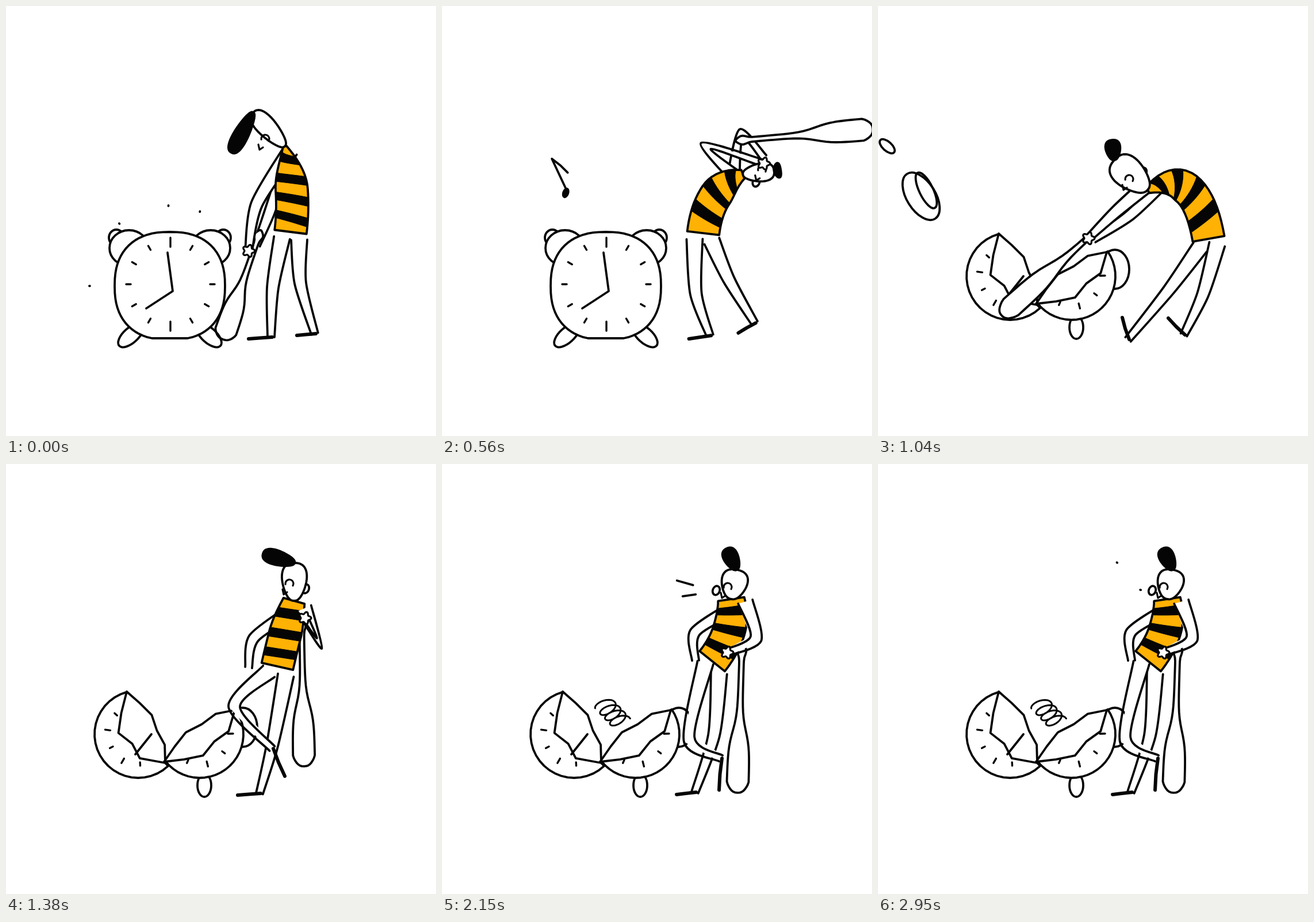
Animation, 748 px wide and 748 px high, one loop 2.98 s. Source, as an HTML page with a canvas:

```html
<!DOCTYPE html>
<html lang="en">
<head>
<meta charset="utf-8">
<title>Alarm clock</title>
<style>
html, body { margin: 0; height: 100%; overflow: hidden; background: #fff; }
canvas { display: block; width: 100vw; height: 100vh; }
</style>
</head>
<body>
<canvas id="stage" width="748" height="748"></canvas>
<script>
const ctx = document.getElementById('stage').getContext('2d');
const LOOP = 2980, HOLD = 70, IMPACT = 940;
const INK = '#050505', PAPER = '#fff', YELLOW = '#ffb104';
const { PI, sin, cos, abs, min, max, sign, hypot, atan2 } = Math;
const rad = degrees => degrees * PI / 180;

// Joints of each key pose. Legs: knee, heel, toe. Arms: elbow, hand.
// Bat: grip x, y, angle, length. Build: half neck, half head, stripe slant, stripes.
const tired = {
  spine: [[485, 244], [497, 320], [495, 393]], build: [3, 17, -.04, 4],
  crown: [430, 185], hair: [392, 255], eye: [451, 231], ear: [463, 213],
  nearArm: [[436, 345], [422, 426]], farArm: [[458, 360], [436, 416]],
  nearLeg: [[464, 490], [461, 576], [422, 579]], farLeg: [[512, 482], [537, 570], [506, 573]],
  bat: [443, 390, 109, 201]
};
const bent = {
  spine: [[504, 254], [521, 320], [516, 396]], build: [7, 17, -.04, 4],
  crown: [414, 227], hair: [380, 291], eye: [458, 250], ear: [468, 233],
  nearArm: [[437, 327], [407, 398]], farArm: [[458, 325], [424, 376]],
  nearLeg: [[451, 486], [461, 575], [422, 579]], farLeg: [[497, 466], [537, 570], [507, 573]],
  bat: [428, 366, 107, 216]
};
const raised = {
  spine: [[527, 300], [468, 331], [443, 395]], build: [8, 16, -.06, 3],
  crown: [608, 298], hair: [628, 284], eye: [575, 291], ear: [561, 320],
  nearArm: [[463, 228], [588, 251]], farArm: [[532, 204], [585, 243]],
  nearLeg: [[440, 503], [467, 573], [431, 579]], farLeg: [[500, 479], [545, 548], [517, 568]],
  bat: [526, 210, 401, 244]
};
const smashing = {
  spine: [[469, 320], [537, 318], [575, 405]], build: [6, 27, .05, 4],
  crown: [411, 268], hair: [407, 233], eye: [437, 301], ear: [461, 289],
  nearArm: [[415, 357], [366, 404]], farArm: [[438, 364], [375, 406]],
  nearLeg: [[505, 495], [435, 580], [425, 542]], farLeg: [[565, 502], [532, 572], [505, 543]],
  bat: [432, 343, 138, 292]
};
const proud = {
  spine: [[501, 238], [485, 298], [472, 352]], build: [19, 22, .02, 3],
  crown: [502, 172], hair: [447, 156], eye: [493, 208], ear: [521, 217],
  nearArm: [[545, 312], [520, 268]], farArm: [[431, 303], [422, 354]],
  nearLeg: [[397, 422], [463, 495], [485, 543]], farLeg: [[463, 490], [441, 573], [403, 576]],
  bat: [514, 266, 89, 260]
};
const whistling = {
  spine: [[503, 235], [499, 290], [470, 343]], build: [23, 23, .02, 3],
  crown: [513, 184], hair: [495, 147], eye: [497, 214], ear: [477, 220],
  nearArm: [[546, 304], [496, 328]], farArm: [[440, 293], [441, 342]],
  nearLeg: [[430, 479], [485, 512], [482, 567]], farLeg: [[473, 472], [440, 571], [408, 575]],
  bat: [522, 312, 91.8, 260]
};
const ACTING = [[0, tired], [350, bent], [630, raised], [840, raised], [950, smashing],
  [1080, smashing], [1330, proud], [1500, proud], [1820, whistling]];

const REST = { at: [285, 487], tilt: 0, size: [1, 1] };
const RINGING = [[0, REST], [350, { at: [281, 462], tilt: -16, size: [.95, 1] }], [560, REST],
  [770, { at: [281, 453], tilt: 0, size: [1, .83] }], [910, REST]];

const blend = (a, b, k) => typeof a === 'number' ? a + (b - a) * k
  : Array.isArray(a) ? a.map((v, i) => blend(v, b[i], k))
  : Object.fromEntries(Object.keys(a).map(name => [name, blend(a[name], b[name], k)]));

function stateAt(track, t) {
  const next = track.findIndex(key => key[0] > t);
  if (next < 0) return track.at(-1)[1];
  const [t0, a] = track[next - 1], [t1, b] = track[next];
  const k = (t - t0) / (t1 - t0);
  return blend(a, b, k * k * (3 - 2 * k));
}

const range = (n, make) => Array.from({ length: n }, (_, i) => make(i));
const move = ([x, y], dx, dy) => [x + dx, y + dy];
const polar = ([x, y], angle, r) => [x + r * cos(angle), y + r * sin(angle)];
const unit = ([ax, ay], [bx, by]) => {
  const length = hypot(bx - ax, by - ay) || 1;
  return [(bx - ax) / length, (by - ay) / length];
};

function paint(fill, width = 3.8) {
  if (fill) { ctx.fillStyle = fill; ctx.fill(); }
  ctx.lineWidth = width;
  ctx.stroke();
}

function line(list, fill, width) {
  ctx.beginPath();
  list.forEach(p => ctx.lineTo(...p));
  paint(fill, width);
}

function ellipse(x, y, rx, ry, tilt = 0, fill) {
  ctx.beginPath();
  ctx.ellipse(x, y, rx, ry, rad(tilt), 0, 2 * PI);
  paint(fill);
}

function placed([x, y], angle, [sx, sy], drawing) {
  ctx.save();
  ctx.translate(x, y);
  ctx.rotate(rad(angle));
  ctx.scale(sx, sy);
  drawing();
  ctx.restore();
}

// Smooth curve through all points.
function smooth(list) {
  ctx.moveTo(...list[0]);
  for (let i = 0; i < list.length - 1; i++) {
    const b = list[i], c = list[i + 1], a = list[i - 1] || b, d = list[i + 2] || c;
    ctx.bezierCurveTo(b[0] + (c[0] - a[0]) / 7, b[1] + (c[1] - a[1]) / 7,
      c[0] - (d[0] - b[0]) / 7, c[1] - (d[1] - b[1]) / 7, ...c);
  }
}

// Two outlines at the given half widths around a chain of joints.
function limb(joints, widths) {
  const side = way => joints.map((p, i) => {
    const [tx, ty] = unit(joints[max(0, i - 1)], p), [ux, uy] = unit(p, joints[min(joints.length - 1, i + 1)]);
    const [nx, ny] = unit([0, 0], [-ty - uy, tx + ux]);
    return move(p, nx * widths[i] * way, ny * widths[i] * way);
  });
  const left = side(1), right = side(-1);
  ctx.fillStyle = PAPER;
  ctx.beginPath();
  [...left, ...right.reverse()].forEach(p => ctx.lineTo(...p));
  ctx.fill();
  ctx.beginPath();
  smooth(left);
  smooth(right);
  paint();
}

// Egg from the wide end a to the narrow end b.
function egg(a, b, half, fill) {
  const [tx, ty] = unit(a, b);
  line(range(49, i => {
    const phi = i * PI / 24, u = (1 - cos(phi)) / 2;
    const v = sign(sin(phi)) * abs(sin(phi)) ** .8 * half * (1.2 - .5 * u);
    return [a[0] + (b[0] - a[0]) * u - ty * v, a[1] + (b[1] - a[1]) * u + tx * v];
  }), fill);
}

function drawBat([x, y, angle, length]) {
  const half = u => 4 + 15 / (1 + Math.exp(10 - 17 * u)) + 5 * Math.exp(-((u * 25 - 1) ** 2));
  const side = way => range(41, i => {
    const u = (1 - cos(i * PI / 40)) / 2;
    return [u * length, way * half(u) * min(1, 3 * (u * (1 - u)) ** .4)];
  });
  placed([x, y], angle, [1, 1], () => line([...side(1), ...side(-1).reverse()], PAPER));
}

function drawClock({ at, tilt, size }) {
  placed(at, tilt, size, () => {
    for (const way of [-1, 1]) {
      ellipse(93 * way, -84, 13, 14);
      ellipse(71 * way, -66, 34, 31, 0, PAPER);
      ellipse(68 * way, 86, 27, 13, 42 * way);
    }
    const round = v => sign(v) * abs(v) ** .84;
    line(range(73, i => [96 * round(cos(i * PI / 36)), min(91, 94 * round(sin(i * PI / 36)))]), PAPER);
    for (let i = 0; i < 12; i++) {
      const reach = i % 3 ? 4 : i % 2 ? 8 : 4;
      line([polar([1, -3], i * PI / 6, 73 - reach), polar([1, -3], i * PI / 6, 73 + reach)], null, 3.4);
    }
    line([[-4, -58], [5, 9], [-41, 39]]);
  });
}

// Jagged crack between two points, bulging to one side.
function crack(from, to, bulge) {
  const [tx, ty] = unit(from, to);
  return range(6, i => {
    const u = i / 5, v = bulge * sin(PI * u) ** .6 * (i % 2 ? .85 : 1.15);
    return [from[0] + (to[0] - from[0]) * u - ty * v, from[1] + (to[1] - from[1]) * u + tx * v];
  });
}

function drawShard(centre, from, to, depth, ticks) {
  const a = atan2(from[1] - centre[1], from[0] - centre[0]);
  let b = atan2(to[1] - centre[1], to[0] - centre[0]);
  if (b > a) b -= 2 * PI;
  const rim = range(25, i => polar(centre, a + (b - a) * i / 24, 76));
  const back = crack(from, to, -17);
  line([...rim, ...back.slice().reverse()], PAPER);
  line(crack(from, to, depth));
  for (let i = 0; i < ticks; i++) {
    const angle = a + (b - a) * (.16 + .65 * i / (ticks - 1));
    line([polar(centre, angle, 49), polar(centre, angle, i % 2 ? 58 : 55)], null, 3.4);
  }
}

function drawWreck() {
  ellipse(412, 458, 25, 34);
  ellipse(345, 559, 12, 20);
  drawShard([230, 470], [210, 396], [277, 520], 42, 5);
  line([[253, 470], [225, 505]]);
  drawShard([337, 470], [275, 518], [398, 428], 28, 4);
}

function drawSpring(t) {
  if (t < 1510) return;
  const age = min(1, (t - 1510) / 840);
  const stretch = 1 - Math.exp(-age * 6) * cos(age * 24);
  line(range(81, i => {
    const k = i / 80, turn = PI * (1 + k * 7);
    const coil = polar([322 + (30 * k - 40) * stretch, 456 + (32 * k - 38) * stretch], rad(-25), 17 * cos(turn));
    return polar(coil, rad(65), 9 * sin(turn));
  }), null, 3);
}

function drawDebris(t) {
  const s = (t - 980) / 140;
  if (s > 2) return;
  placed([75 - 100 * s, 331 - 70 * s], 58 - 30 * s, [1, 1], () => {
    ellipse(0, 0, 46, 25);
    ellipse(-4, -13, 34, 12, 6);
  });
  ellipse(16 - 130 * s, 244 - 80 * s, 16, 8, 42);
}

function drawNote(at, size, tilt) {
  placed(at, tilt, [size, size], () => {
    line([[15, 30], [-15, -34], [3, -20], [17, -6]], null, 3.8 / size);
    ellipse(13, 35, 5, 9, 20, INK);
  });
}

function drawNotes(t) {
  const k = (t - 350) / 140, j = (770 - t) / 210;
  if (abs(k) <= 1) drawNote([207 - 12 * k, 300 - 35 * k], 1 - .35 * abs(k), 12 * k);
  if (j > -.5 && j <= 1) drawNote([190 + 14 * j, 245 + 50 * j], .36 + .5 * j, 45 * (1 - j));
}

// A mark that shoots outward, then shrinks to a dot at its far end.
function drawRay(t, origin, degrees, near, far, start, end) {
  if (t < start || t > end) return;
  const p = (t - start) / (end - start) * 2;
  const at = k => polar(origin, rad(degrees), near + (far - near) * k);
  line([at(max(0, p - 1)), at(min(1, p))]);
}

function drawRays(t) {
  const bell = [285, 487], mouth = [476, 222];
  for (const angle of [180, -129, -91, -68]) drawRay(t, bell, angle, 110, 140, -345, 5);
  for (const angle of [-149, -81]) drawRay(t, bell, angle, 155, 213, 70, 355);
  for (const start of [1930, 2270]) {
    drawRay(t, mouth, 196, 41, 70, start, start + 340);
    drawRay(t, mouth, 172, 35, 58, start, start + 340);
  }
  drawRay(t, mouth, 220, 45, 79, 2600, 2945);
  drawRay(t, mouth, 189, 19, 58, 2935, 3280);
}

function makeTorso({ spine: [neck, middle, waist], build: [neckHalf] }) {
  const control = neck.map((v, i) => 2 * middle[i] - (v + waist[i]) / 2);
  return (u, side) => {
    const [a, b] = [blend(neck, control, u), blend(control, waist, u)];
    const [tx, ty] = unit(a, b);
    const half = side * (neckHalf + (28 - neckHalf) * sin(PI / 2 * min(1, u * 2)));
    return move(blend(a, b, u), -ty * half, tx * half);
  };
}

function drawTorso(torso, [, , slant, count]) {
  const stripes = Math.round(count);
  const edge = side => range(21, i => torso(i / 20, side));
  const outline = [...edge(1), ...edge(-1).reverse()];
  line([...outline, outline[0]], YELLOW);
  for (let i = 0; i < stripes; i++) {
    const u = (i + .62) / (stripes + .35), h = .2 / stripes;
    const across = v => range(9, j => torso(min(.98, max(.01, v + slant * (1 - j / 4))), .98 - j * .245));
    line([...across(u - h), ...across(u + h).reverse()], INK, 1);
  }
}

function drawLeg(hip, [knee, heel, toe]) {
  limb([hip, knee, heel], [14, 10, 6]);
  line([move(heel, 2, 0), blend(heel, toe, .5), toe], null, 6);
}

function drawFist([x, y]) {
  line(range(41, i => polar([x, y], i * PI / 20, 9 + 2 * cos(i * PI / 4))), PAPER, 3.2);
}

function drawHead({ spine: [neck], build: [, half], crown, hair, eye, ear }) {
  ellipse(...ear, 6, 8, 20, PAPER);
  egg(crown, neck, half, PAPER);
  egg(hair, crown, 13, INK);
  ctx.beginPath();
  ctx.arc(...eye, 7, rad(170), rad(390));
  paint(null, 3.2);
  const nose = move(eye, -10, 14);
  line([move(nose, -2, -4), move(nose, 0, 5), move(nose, 6, 1)], null, 3.2);
}

function drawPerson(pose, torso) {
  const [neck, , waist] = pose.spine;
  const hip = side => move(blend(waist, torso(1, side), .54), 0, 12);
  const arm = () => limb([torso(.06, -1), ...pose.nearArm], [13, 10, 6]);
  const armInFront = pose.nearArm[0][0] > neck[0];
  drawLeg(hip(-1), pose.farLeg);
  drawLeg(hip(1), pose.nearLeg);
  if (!armInFront) arm();
  drawTorso(torso, pose.build);
  drawHead(pose);
  if (armInFront) arm();
  drawFist(pose.nearArm[1]);
}

function render(now) {
  const t = Math.floor(now % LOOP / HOLD) * HOLD;
  const pose = stateAt(ACTING, t), torso = makeTorso(pose);
  const broken = t >= IMPACT;
  ctx.fillStyle = PAPER;
  ctx.fillRect(0, 0, 748, 748);
  ctx.strokeStyle = INK;
  ctx.lineCap = ctx.lineJoin = 'round';
  if (broken) {
    drawSpring(t);
    drawWreck();
    drawDebris(t);
  }
  limb([torso(.15, 0), ...pose.farArm], [11, 9, 6]);
  drawBat(pose.bat);
  if (!broken) {
    drawClock(stateAt(RINGING, t));
    drawNotes(t);
  }
  drawPerson(pose, torso);
  drawRays(t);
}

const began = performance.now();
function tick() {
  render(performance.now() - began);
  requestAnimationFrame(tick);
}
tick();
</script>
</body>
</html>
```
